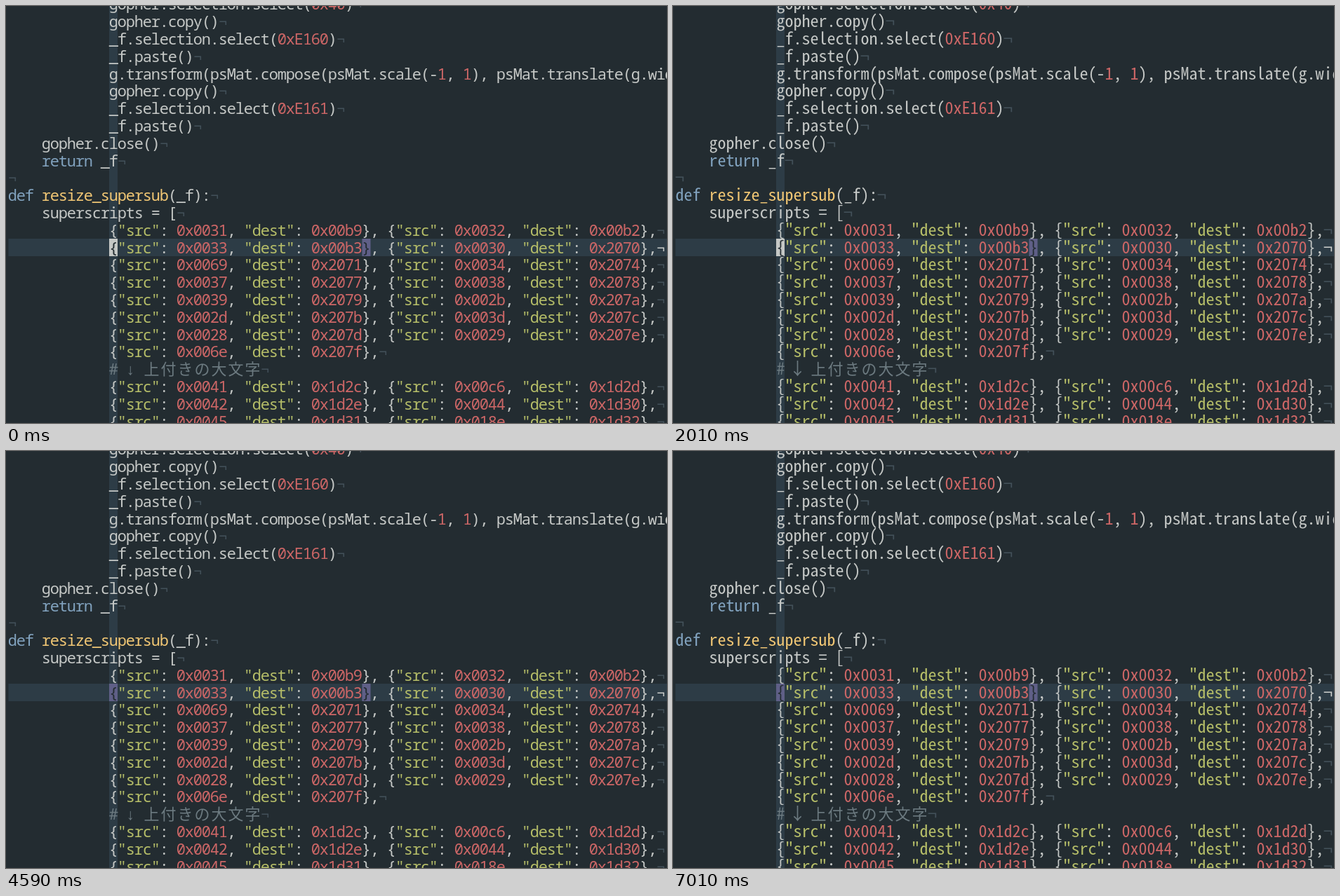
Animation of 942x595 px, one loop 8000 ms. Source, as an HTML page with a canvas:

```html
<!DOCTYPE html>
<html lang="en">
<head>
<meta charset="utf-8">
<title>Editor font comparison</title>
<style>
html, body { margin: 0; width: 100%; height: 100%; overflow: hidden; background: #232c31; }
canvas { display: block; }
</style>
</head>
<body>
<canvas id="stage" width="942" height="595"></canvas>
<script>
const ctx = document.getElementById('stage').getContext('2d');
const W = 942, H = 595, LOOP = 8000;
const LEFT = 3.4, CELL = 12, TOP = -14.9, PITCH = 24.8;
const CURSOR = { row: 14, col: 12 }, MATCH_COL = 42;

const color = {
  bg: '#232c31', line: '#2d3c46', text: '#c5c8c6', mark: '#425059',
  comment: '#6c7a80', string: '#b5bd68', number: '#cc6666',
  keyword: '#81a2be', name: '#f0c674', match: '#5f5f87'
};

const fonts = {
  humanist: { css: 'semi-condensed 22px "Noto Sans Mono", monospace', base: 20.3 },
  square: { css: '24px "Noto Sans Mono CJK JP", "Noto Sans Mono", monospace', base: 20.3 }
};
const wideFont = '22px "Noto Sans CJK JP", "Noto Sans CJK", sans-serif';

// Start time, font, and whether the block cursor is lit
const phases = [
  [0, 'humanist', true], [300, 'humanist', false],
  [2010, 'square', true], [2610, 'square', false],
  [4140, 'humanist', true], [4590, 'humanist', false],
  [6420, 'square', true], [7010, 'square', false]
];

const deep = ' '.repeat(12);
const entry = (src, dest) => `{"src": 0x${src}, "dest": 0x${dest}},`;
const entries = codes => {
  const c = codes.split(' ');
  const out = [];
  for (let i = 0; i < c.length; i += 2) out.push(entry(c[i], c[i + 1]));
  return deep + out.join(' ');
};

const lines = [
  deep + 'gopher.selection.select(0x40)',
  deep + 'gopher.copy()',
  deep + '_f.selection.select(0xE160)',
  deep + '_f.paste()',
  deep + 'g.transform(psMat.compose(psMat.scale(-1, 1), psMat.translate(g.width, 0)))',
  deep + 'gopher.copy()',
  deep + '_f.selection.select(0xE161)',
  deep + '_f.paste()',
  '    gopher.close()',
  '    return _f',
  '',
  'def resize_supersub(_f):',
  '    superscripts = [',
  entries('0031 00b9 0032 00b2'),
  entries('0033 00b3 0030 2070'),
  entries('0069 2071 0034 2074'),
  entries('0037 2077 0038 2078'),
  entries('0039 2079 002b 207a'),
  entries('002d 207b 003d 207c'),
  entries('0028 207d 0029 207e'),
  entries('006e 207f'),
  deep + '# ↓ 上付きの大文字',
  entries('0041 1d2c 00c6 1d2d'),
  entries('0042 1d2e 0044 1d30'),
  entries('0045 1d31 018e 1d32')
];

const syntax = /(#.*)|("[^"]*")|(0x[\da-fA-F]+|\b\d+\b)|\b(def|return)\b|(resize_supersub)|([\s\S])/g;
const kinds = ['comment', 'string', 'number', 'keyword', 'name', 'text'];
const isWide = ch => ch >= '\u3000';
const cellX = col => LEFT + col * CELL;
const rowY = row => TOP + row * PITCH;

function layout(line, row) {
  const cells = [];
  let col = 0;
  const add = (ch, kind) => {
    const span = isWide(ch) ? 2 : 1;
    if (ch !== ' ') cells.push({ ch, kind, row, col, span });
    col += span;
  };
  for (const m of line.matchAll(syntax)) {
    const kind = kinds[m.slice(1).findIndex(g => g !== undefined)];
    for (const ch of m[0]) add(ch, kind);
  }
  add('¬', row === CURSOR.row ? 'text' : 'mark');
  return cells;
}
const cells = lines.flatMap(layout);

function block(x, y, w, h, fill) {
  ctx.fillStyle = fill;
  ctx.fillRect(x, y, w, h);
}

function draw(fontName, lit) {
  const font = fonts[fontName];
  block(0, 0, W, H, color.bg);
  block(147, 0, CELL, H, color.line);
  block(LEFT, 332, W, 25, color.line);
  block(507.5, 332, CELL, 25, color.match);
  block(147, 332, CELL, 25, lit ? color.text : color.match);

  ctx.textAlign = 'center';
  ctx.textBaseline = 'alphabetic';
  for (const { ch, kind, row, col, span } of cells) {
    if (cellX(col) > W) continue;
    const bracket = row === CURSOR.row && (col === CURSOR.col || col === MATCH_COL);
    ctx.font = span === 2 ? wideFont : font.css;
    ctx.fillStyle = bracket ? color.bg : color[kind];
    ctx.fillText(ch, cellX(col + span / 2), rowY(row) + font.base);
  }
}

let shown = -1;
function tick(now) {
  const t = now % LOOP;
  const index = phases.findLastIndex(([start]) => t >= start);
  if (index !== shown) {
    shown = index;
    draw(phases[index][1], phases[index][2]);
  }
  requestAnimationFrame(tick);
}
draw('humanist', true);
requestAnimationFrame(tick);
</script>
</body>
</html>
```
